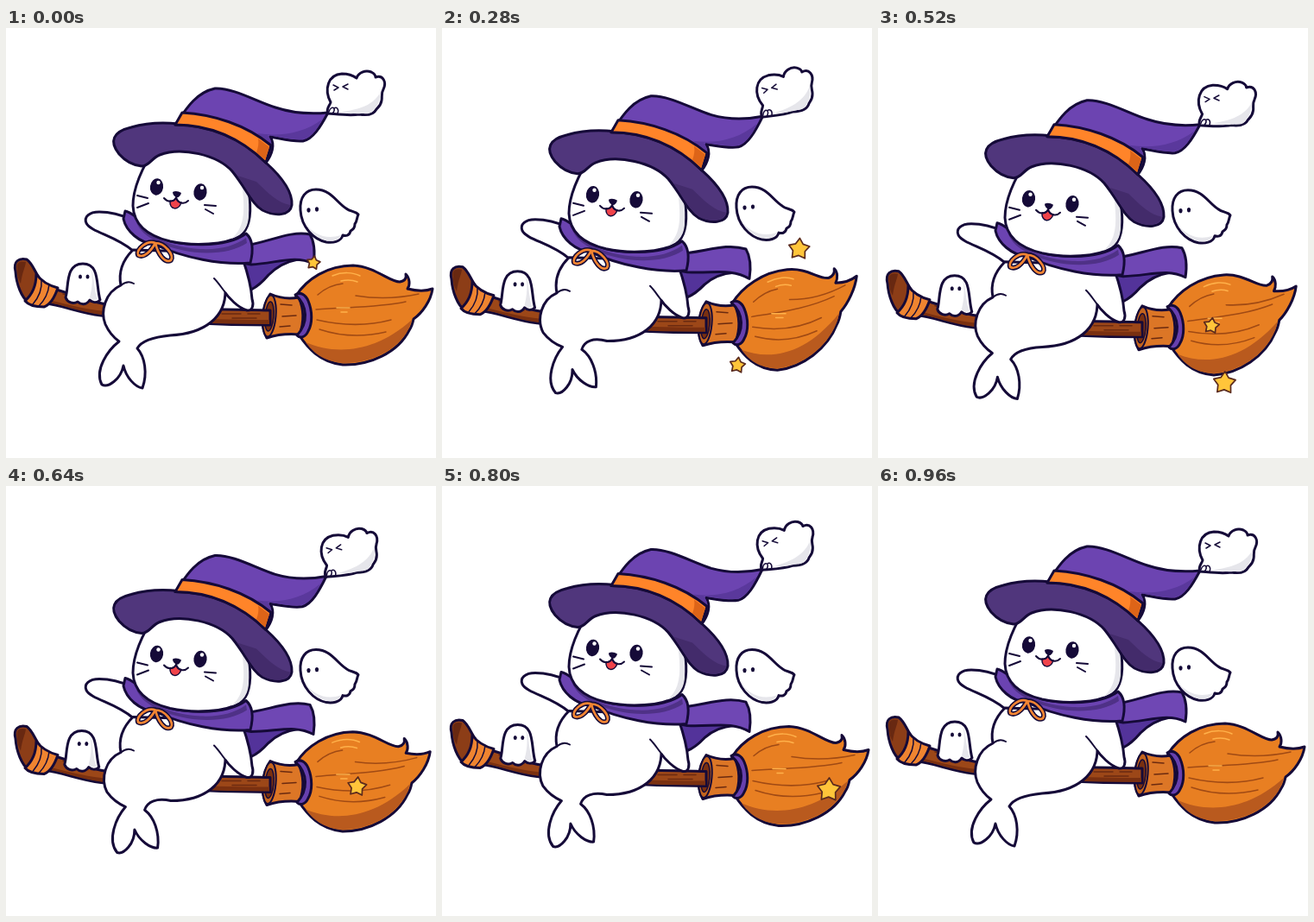
These frames come from a looping animation (498x498 px, 1 s). An HTML page:

```html
<!DOCTYPE html>
<html lang="en">
<head>
<meta charset="utf-8">
<title>Seal on a broom</title>
<style>
html, body { margin: 0; width: 100%; height: 100%; overflow: hidden; background: #fff; }
svg { display: block; width: 100vw; height: 100vh; }
.o { stroke: #150a38; stroke-width: 3; stroke-linejoin: round; stroke-linecap: round; }
.l { stroke: #150a38; stroke-width: 2; stroke-linecap: round; stroke-linejoin: round; }
.thin { stroke-width: 1.5; }
.w { fill: #fff; }
.g { fill: #e6e6eb; }
.ink { fill: #150a38; }
.grain, .straw, .shine { fill: none; stroke-width: 1.5; stroke-linecap: round; }
.grain { stroke: #6b2a10; }
.straw { stroke: #a04a14; }
.shine { stroke: #ffb14a; }
</style>
</head>
<body>
<svg viewBox="0 0 498 498" xmlns="http://www.w3.org/2000/svg">
<g id="rider">
  <!-- bristles, binding, stick -->
  <path class="o" fill="#e87f22" data-warp="straw" d="M336 310 C348 291 372 275 402 275 C427 276 444 294 456 294 C462 293 464 290 463 285 C468 290 468 298 465 302 C477 305 486 305 494 302 C492 316 482 330 472 337 C471 342 470 346 467 350 C454 376 421 391 390 390 C363 387 349 370 339 355 Z"/>
  <path fill="#b95a1e" data-warp="straw" d="M347 364 C380 378 425 378 470 338 C468 343 468 346 466 349 C453 374 421 389 390 388 C367 386 355 375 347 364 Z"/>
  <path class="straw" data-warp="straw" d="M359 326 C395 323 430 324 463 317 M360 338 C390 345 420 345 446 338 M363 349 C390 358 415 358 440 352 M405 310 C430 314 455 313 478 308 M361 309 C370 301 380 297 390 296"/>
  <path class="shine" data-warp="straw" d="M378 287 C390 282 402 283 410 287 M388 293 C396 291 402 292 407 294 M383 324 H398 M388 329 H395"/>
  <path class="o" fill="#dc7626" d="M306 308 C317 313 328 314 339 312 C345 325 345 341 340 355 C328 354 314 355 302 359 C294 345 296 322 306 308 Z"/>
  <ellipse class="l" fill="#c4641e" cx="305" cy="333.500" rx="7.5" ry="24" transform="rotate(5 305 333.500)"/>
  <ellipse class="l thin" fill="#7a3010" cx="305" cy="334" rx="5" ry="17" transform="rotate(5 305 334)"/>
  <path class="grain" d="M318 320 L331 321 M320 334 L336 333 M317 346 L329 345"/>
  <path class="o" fill="#6740ae" d="M335 309 C341 305 347 309 350 316 C355 328 355 342 350 351 C347 358 341 360 337 356 C350 342 350 322 335 309 Z"/>
  <path class="o" fill="#9c4718" d="M52 301 C75 307 95 318 125 321 C180 326 240 325 306 327 L306 344 C240 344 180 341 110 333 C85 330 65 321 46 319 Z"/>
  <path fill="#7a3010" d="M50 315 C75 321 95 327 125 329 C180 336 240 338 305 338 L305 343 C240 343 180 340 110 332 C85 329 66 320 47 318 Z"/>
  <path class="grain" d="M66 308 C78 311 85 316 95 318 M250 331 H272 M262 336 H290 M280 331 H294"/>
  <path class="o" fill="#8c3d17" d="M11 282 C8 270 15 266 24 268 C31 273 33 282 39 290 L26 318 C18 312 12 297 11 282 Z"/>
  <path fill="#682811" d="M13 280 C11 272 16 269 23 271 C22 278 19 282 17 296 C14 291 13 286 13 280 Z"/>
  <path class="o" fill="#ef8430" d="M35 285 C40 292 49 298 60 301 C57 310 52 320 44 323 C35 323 26 321 22 316 C30 309 35 298 35 285 Z"/>
  <path class="l thin" fill="none" d="M41 292 C42 303 37 313 31 320 M50 297 C49 307 44 316 38 322"/>

  <!-- cape tail -->
  <path class="o" fill="#53339a" data-warp="cape" d="M262 266 C290 268 315 262 338 268 C322 271 312 278 304 286 C298 293 292 299 284 303 Z"/>
  <path class="o" fill="#6f47b4" data-warp="cape" d="M270 253 C302 250 327 234 352 239 C358 249 358 260 356 273 C335 263 315 272 284 274 L262 270 Z"/>

  <!-- body -->
  <path class="o w" d="M146 222 C135 217 121 213 108 213 C96 213 90 219 93 226 C99 237 126 240 147 258"/>
  <path class="o w" d="M238 270 L252 304 C258 313 269 324 279 327 C286 328 287 320 285 314 C284 300 281 287 274 267 Z"/>
  <path class="o w" data-warp="tail" d="M147 257 C134 270 130 283 133 298 C115 306 109 328 115 343 C119 352 124 358 131 363 C118 373 102 396 111 413 C118 417 133 407 136 391 C139 405 150 416 158 417 C164 400 161 381 152 371 C157 362 170 358 190 356 C230 354 255 335 254 303 L250 260 Z"/>
  <path class="w" d="M200 262 L270 271 C279 286 282 304 283 318 C274 320 262 311 253 304 Z"/>
  <path class="l" fill="none" d="M133 298 C138 294 143 293 148 296 M241 290 C246 295 249 300 253 305"/>

  <!-- collar -->
  <path class="o" fill="#6b43b1" d="M138 212 C146 213 160 226 175 241 C200 254 255 255 278 238 C285 244 287 256 283 272 C250 275 205 266 173 251 C154 249 139 235 136 221 Z"/>
  <path fill="#4f3187" d="M150 223 C160 240 190 254 225 256 C247 257 264 253 278 243 L279 249 C255 265 210 264 176 248 C163 242 154 234 150 223 Z"/>
  <g fill="none" stroke-linecap="round" stroke-linejoin="round">
    <path stroke="#150a38" stroke-width="5.8" d="M173 249 C163 245 150 257 153 263 C160 267 168 258 173 249 C184 249 195 263 191 269 C184 273 176 262 173 249"/>
    <path stroke="#f18432" stroke-width="2.7" d="M173 249 C163 245 150 257 153 263 C160 267 168 258 173 249 C184 249 195 263 191 269 C184 273 176 262 173 249"/>
  </g>

  <!-- head -->
  <path class="o w" d="M175 135 C157 162 147 186 147 206 C148 228 165 241 190 247 C218 253 254 251 271 241 C283 232 284 214 282 196 C280 180 274 165 262 145 Z"/>
  <path class="g" d="M273 178 C276 205 279 230 261 244 C275 239 282 231 281 211 C281 198 279 187 275 178 Z"/>
  <g class="ink">
    <ellipse cx="174.500" cy="184" rx="7.6" ry="9.800" transform="rotate(8 174.500 184)"/>
    <ellipse cx="225" cy="190" rx="7.6" ry="9.800" transform="rotate(8 225 190)"/>
    <path d="M193 190 C196 188 200 189 203 191 C202 195 199 197 197 196 C195 195 193 193 193 190 Z"/>
  </g>
  <g class="w">
    <circle cx="176.500" cy="179" r="2.2"/>
    <circle cx="227" cy="185" r="2.2"/>
  </g>
  <path fill="#f0434a" class="l thin" d="M190 200 C189 211 200 212 203 202 C200 202 198 200 197 197 C195 200 193 201 190 200 Z"/>
  <path class="l" fill="none" d="M183 197 C188 203 195 201 197 196 C199 203 206 205 211 200 M152 194 L164 197 M152 208 L165 203 M230 205 L243 206 M231 210 L240 215"/>

  <!-- hat -->
  <path class="o" fill="#50367c" d="M131 146 C119 131 124 120 145 115 C162 110 182 109 200 111 L260 118 L301 156 C320 173 332 190 331 205 C329 218 311 218 297 211 C284 203 279 187 262 166 C245 147 203 137 178 147 C168 151 166 160 157 160 C147 159 138 154 131 146 Z"/>
  <path fill="#432b6b" d="M290 178 C304 192 316 203 329 205 C326 216 310 216 298 210 C287 203 280 188 268 171 Z"/>
  <path class="o" fill="#6c44b1" data-warp="hat" d="M196 112 C206 98 218 75 242 70 C263 69 290 85 312 92 C333 99 353 100 373 98 C364 115 355 129 344 131 C332 132 318 128 306 126 C312 135 308 147 301 156 C275 129 236 112 196 112 Z"/>
  <path fill="#5a389c" data-warp="hat" d="M291 122 C318 126 344 122 366 106 C359 121 351 128 343 129 C332 130 317 126 303 124 C308 131 308 135 306 138 Z"/>
  <path class="o" fill="#ff8429" d="M204 98 C240 100 278 112 307 136 L301 156 C270 126 236 112 196 112 Z"/>
  <path fill="#dd6418" d="M292 128 L305 138 L300 153 L290 144 C292 139 293 133 292 128 Z"/>

  <!-- ghost on the handle -->
  <g id="sitter">
    <path class="o w" d="M69 312 C73 301 68 273 89 273 C109 273 104 298 109 315 C105 319 100 318 97 315 C93 321 87 321 83 317 C78 320 71 318 69 312 Z"/>
    <path class="g" d="M98 278 C103 287 101 302 106 314 C102 316 99 315 97 312 C100 301 101 289 98 278 Z"/>
    <ellipse class="ink" cx="86" cy="288" rx="2" ry="2.6"/>
    <ellipse class="ink" cx="94.500" cy="288" rx="2" ry="2.6"/>
  </g>

  <!-- ghost on the hat tip -->
  <g id="puller">
    <path class="o w" d="M373 99 C370 94 375 90 376 86 C368 71 373 54 389 53 C397 53 402 55 406 58 C408 52 416 48 423 51 C427 53 428 55 428 57 C437 54 441 63 437 71 C434 76 436 80 435 84 C434 90 431 92 429 94 C425 102 415 101 409 100 C399 102 385 100 373 99 Z"/>
    <path class="g" d="M434 74 C427 86 416 94 388 97 C397 100 412 99 414 99 C421 100 425 98 427 93 C432 89 433 81 434 74 Z"/>
    <path class="l thin" fill="none" d="M379 66 L385 69 L380 72 M396 65 L390 68 L396 71 M374 97 C375 93 378 91 380 93 C381 96 379 98 378 99 M380 93 C383 91 386 94 384 99"/>
  </g>
</g>

<g id="floater">
  <path class="o w" d="M341 211 C340 196 347 187 359 187 C376 187 383 202 394 209 C399 213 405 212 408 216 C406 220 407 223 404 227 C404 232 402 233 399 235 C398 241 393 241 390 240 C388 248 378 249 371 248 C356 245 342 230 341 211 Z"/>
  <path class="g" d="M347 226 C356 240 371 245 388 240 C384 247 376 247 371 246 C360 243 351 236 347 226 Z"/>
  <ellipse class="ink" cx="350.500" cy="211" rx="2.1" ry="2.7"/>
  <ellipse class="ink" cx="360" cy="210" rx="2.1" ry="2.7"/>
</g>
<g id="stars"></g>
</svg>
<script>
const LOOP = 1000, STEP = 40, CYCLE = 960;
const keys = [0, 160, 360, 520, 640, 800, 960];
const $ = id => document.getElementById(id);
const clamp = v => Math.max(0, Math.min(1, v));

// Smooth periodic curve through one value per key time.
function curve(v, t) {
  const n = keys.length - 1;
  const time = i => keys[(i + n) % n] + CYCLE * Math.floor(i / n);
  const val = i => v[(i + n) % n];
  const slope = i => (val(i + 1) - val(i - 1)) / (time(i + 1) - time(i - 1));
  let i = 0;
  while (i < n - 1 && t >= keys[i + 1]) i++;
  const h = keys[i + 1] - keys[i], u = (t - keys[i]) / h, w = 1 - u;
  return w * w * ((1 + 2 * u) * val(i) + u * h * slope(i)) +
         u * u * ((3 - 2 * u) * val(i + 1) - w * h * slope(i + 1));
}

const warped = [...document.querySelectorAll('[data-warp]')]
  .map(el => ({ el, base: el.getAttribute('d'), kind: el.dataset.warp }));

// Each warp maps a resting point to its place in the current pose.
const warps = {
  straw: (x, y, p) => {
    const w = p.bend * clamp((x - 338) / 156) ** 2;
    return [x - 14 * w, y - 24 * w];
  },
  cape: (x, y, p) => [x, y + p.cape * clamp((x - 285) / 70)],
  hat: (x, y, p) => {
    const w = clamp((x - 305) / 68) ** 1.5;
    return [x + p.tipX * w, y + p.tipY * w];
  },
  tail: (x, y, p) => {
    const a = -14 * p.swing * Math.PI / 180 * clamp((y - 325) / 35) * clamp((195 - x) / 30);
    const dx = x - 125, dy = y - 325, c = Math.cos(a), s = Math.sin(a);
    return [125 + dx * c - dy * s, 325 + dx * s + dy * c];
  }
};

function warp(d, fn, pose) {
  return d.replace(/([\d.]+) ([\d.]+)/g, (m, x, y) =>
    fn(+x, +y, pose).map(n => n.toFixed(2)).join(' '));
}

const stars = [
  { born: 0, x: 356, y: 272, dx: 86, dy: -19 },
  { born: 200, x: 335, y: 378, dx: 80, dy: 36 },
  { born: 440, x: 380, y: 341, dx: 68, dy: 11 }
];
const starLife = 400;
const starShape = Array.from({ length: 10 }, (_, i) => {
  const r = i % 2 ? 0.58 : 1, a = i * Math.PI / 5 - Math.PI / 2;
  return (r * Math.cos(a)).toFixed(3) + ' ' + (r * Math.sin(a)).toFixed(3);
}).join(' ');
for (const s of stars) {
  s.el = document.createElementNS('http://www.w3.org/2000/svg', 'polygon');
  s.el.setAttribute('points', starShape);
  s.el.setAttribute('class', 'o');
  s.el.setAttribute('fill', '#ffc53a');
  s.el.style.vectorEffect = 'non-scaling-stroke';
  s.el.style.stroke = '#5a2a1e';
  s.el.style.strokeWidth = 1.7;
  $('stars').append(s.el);
}

function move(el, value) { el.setAttribute('transform', value); }

function drawStar(s, t) {
  const age = t - s.born, u = age / 360;
  const live = age >= 0 && age <= starLife;
  s.el.style.display = live ? '' : 'none';
  if (!live) return;
  const x = s.x + s.dx * u ** 1.6, y = s.y + s.dy * u ** 0.7;
  move(s.el, `translate(${x} ${y}) rotate(${10 - 8 * u}) scale(${8 + 6 * u})`);
}

function draw(t) {
  const phase = 2 * Math.PI * t / CYCLE;
  const pose = {
    bob: 7 * (1 - Math.cos(phase)),
    swing: Math.abs(Math.sin(phase)) ** 1.4,
    bend: curve([0, 0.78, 1, 0.7, 0.2, 0], t),
    cape: curve([0, 4, 10, 2, 4, 8], t),
    tipX: curve([0, -2, -1, 0, -2, -2], t),
    tipY: curve([0, -4, -4, 0, -4, -5], t)
  };
  move($('rider'), `translate(0 ${pose.bob})`);
  move($('sitter'), `translate(${-1.5 * pose.swing} 0)`);
  move($('puller'), `translate(${pose.tipX} ${pose.tipY}) rotate(${-12 * pose.swing} 372 100)`);
  move($('floater'), `translate(0 ${-3 * Math.sin(phase)})`);
  for (const { el, base, kind } of warped) el.setAttribute('d', warp(base, warps[kind], pose));
  for (const s of stars) drawStar(s, t);
}

function tick(now) {
  draw(Math.floor(now % LOOP / STEP) * STEP);
  requestAnimationFrame(tick);
}
draw(0);
requestAnimationFrame(tick);
</script>
</body>
</html>
```
